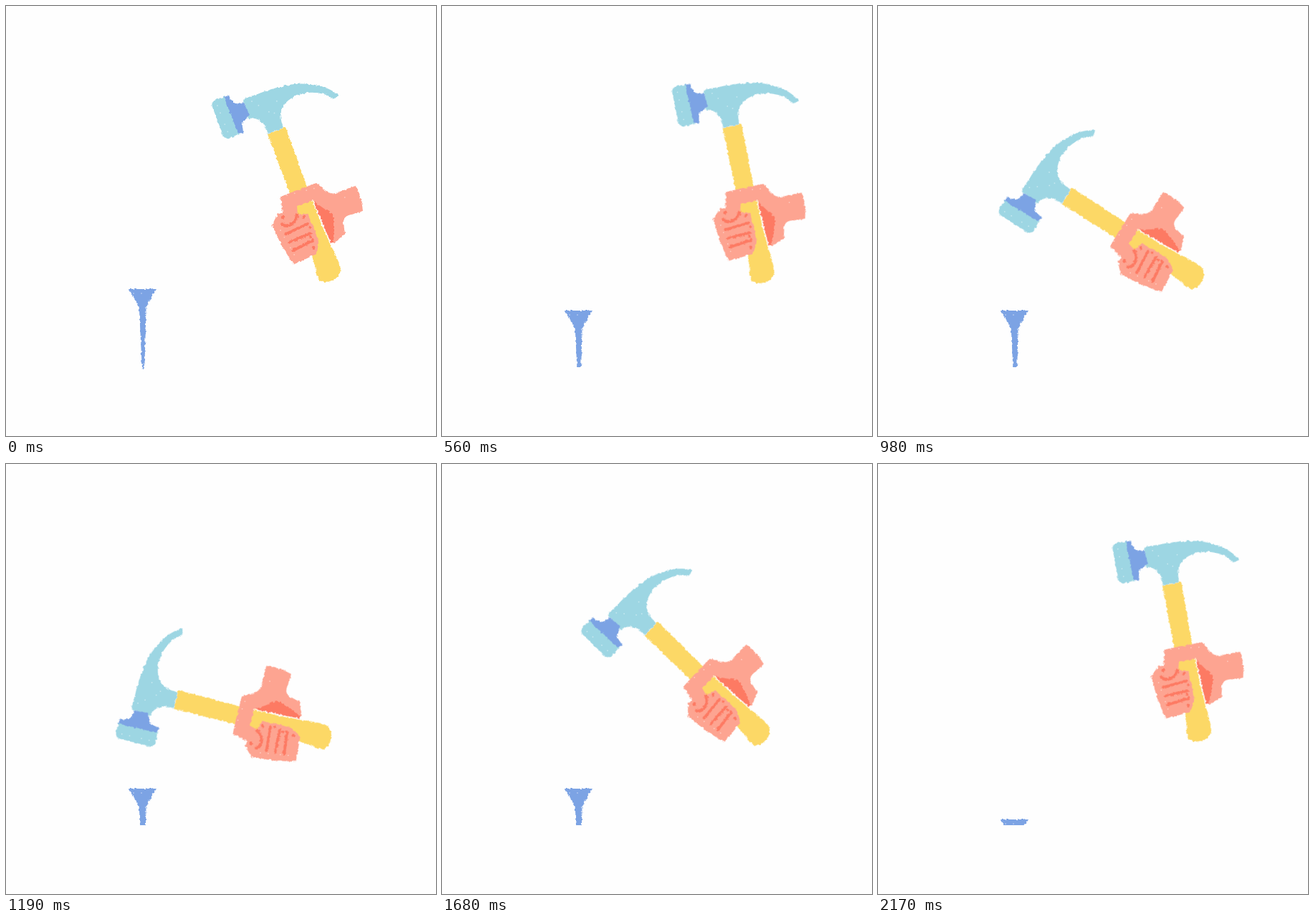
Write an HTML page that moves like this. It is 600 px wide and 600 px high and loops after 2240 ms.

```html
<!DOCTYPE html>
<html lang="en">
<head>
<meta charset="utf-8">
<title>Hammer and nail</title>
<style>
  html, body { margin: 0; width: 100%; height: 100%; overflow: hidden; background: #fefefe; }
  svg { display: block; width: 100vw; height: 100vh; }
  .steel { fill: #9dd6e3; }
  .blue { fill: #7ba3e4; }
  .wood { fill: #fcd866; }
  .skin { fill: #fda491; }
  .palm { fill: #fd7a63; }
  .crease { fill: none; stroke: #fd7a63; stroke-width: 4.5; stroke-linecap: round; stroke-linejoin: round; }
  .fleck { fill: none; stroke: #fff; stroke-opacity: .4; stroke-width: 1.8; stroke-linecap: round; stroke-dasharray: 0 11 0 17; }
</style>
</head>
<body>
<svg viewBox="0 0 600 600">
  <defs>
    <filter id="chalk" filterUnits="userSpaceOnUse" x="0" y="0" width="600" height="600">
      <feTurbulence type="fractalNoise" baseFrequency=".25" numOctaves="2" seed="4"/>
      <feDisplacementMap in="SourceGraphic" scale="4" xChannelSelector="R" yChannelSelector="G"/>
    </filter>
    <clipPath id="ground"><rect id="floor" width="600" height="504"/></clipPath>
  </defs>

  <g clip-path="url(#ground)">
    <g id="nail">
      <path class="blue" filter="url(#chalk)" d="M171 395H210L197 416Q195 419 195.500 425L193.500 499Q193 507 191.500 507Q190 507 189.500 499L186 425Q186 419 183.500 415Z"/>
      <path class="fleck" d="M178 401H204"/>
    </g>
  </g>

  <g id="hammer">
    <g filter="url(#chalk)">
      <path class="wood" d="M365 179L390 169L419 250L441 307L465 359Q469 369 464 377Q456 384 446 385Q438 386 435 378L426 345L395 259Z"/>
      <path class="steel" d="M331 132Q335 127 345 125Q378 112 402 109Q440 106 464 124L458 130Q443 119 420 121Q393 126 385 143Q381 155 387 170L366 178Q361 165 355 160Q346 155 338 157Z"/>
      <path class="steel" d="M291 132L305 126L326 178L311 185Q306 186 303 181L288 141Q286 135 291 132Z"/>
      <path class="blue" d="M304 127L311 125Q314 131 318 135Q324 138 331 134L340 152Q332 158 330 164Q329 170 332 176L324 178Z"/>
      <path class="palm" d="M428 270L446 275L460 290L458 330L453 330Z"/>
      <path class="skin" d="M383 266L433 247L449 260Q456 263 463 260L488 251Q496 265 498 286L478 292Q470 295 471 303L473 318L457 331L457 291Q443 283 428 271L406 279L407 291L420 289Q424 296 425 301L434 319Q438 331 434 342L431 347L401 361L384 333L371 306L379 290L386 289Z"/>
      <g class="crease">
        <path d="M385 305Q393 309 399 304Q406 299 406 291"/>
        <path d="M391 318L421 304M395 330L425 317M401 341L428 327" stroke-width="4"/>
        <path d="M386 295h.1M416 294h.1M424 309h.1M425 322h.1M429 337h.1"/>
      </g>
    </g>
    <path class="fleck" d="M295 139L310 177M343 133L374 152L380 122M392 264L432 254L482 270M383 313L405 352"/>
  </g>
</svg>
<script>
  const STEP = 70, STEPS = 32;
  const hammer = document.getElementById('hammer');
  const nail = document.getElementById('nail');
  const floor = document.getElementById('floor');

  // step, handle angle, grip x, grip y, ease into the pose (positive: in, negative: out)
  const poses = [
    [0, 69.7, 455, 382, 1],
    [4, 20.3, 456.7, 373.5, 1],
    [5, 5.5, 453, 381, 1],
    [8, 78.5, 449.5, 385, 1.3],
    [10, 94, 452, 383, -2],
    [12, 79.3, 449, 385, 2],
    [15, 0, 452.6, 383, 1.3],
    [17, 14.3, 452.6, 383, 1.7],
    [21, 82.4, 450, 384.5, -1.5],
    [26, -8.6, 453.5, 384, 1.7],
    [27, 6, 453, 384.5, 1],
    [30, 81, 450, 386, -1.5],
    [32, 69.7, 455, 382, 3]
  ];
  const hits = [[5, 30], [15, 58], [26, 101]];

  const ease = (t, p) => p > 0 ? t ** p : 1 - (1 - t) ** -p;

  function poseAt(step) {
    const i = poses.findIndex(p => p[0] > step);
    const a = poses[i - 1], b = poses[i];
    const k = ease((step - a[0]) / (b[0] - a[0]), b[4]);
    return [1, 2, 3].map(n => a[n] + (b[n] - a[n]) * k);
  }

  function draw() {
    const step = Math.floor(performance.now() / STEP) % STEPS;
    const [angle, x, y] = poseAt(step);
    const depth = hits.reduce((d, [at, to]) => step >= at ? to : d, 0);
    hammer.setAttribute('transform', `translate(${x} ${y}) rotate(${angle - 69.7}) translate(-455 -382)`);
    nail.setAttribute('transform', `translate(0 ${depth})`);
    floor.setAttribute('height', depth ? 504 : 510);
    requestAnimationFrame(draw);
  }
  draw();
</script>
</body>
</html>
```
